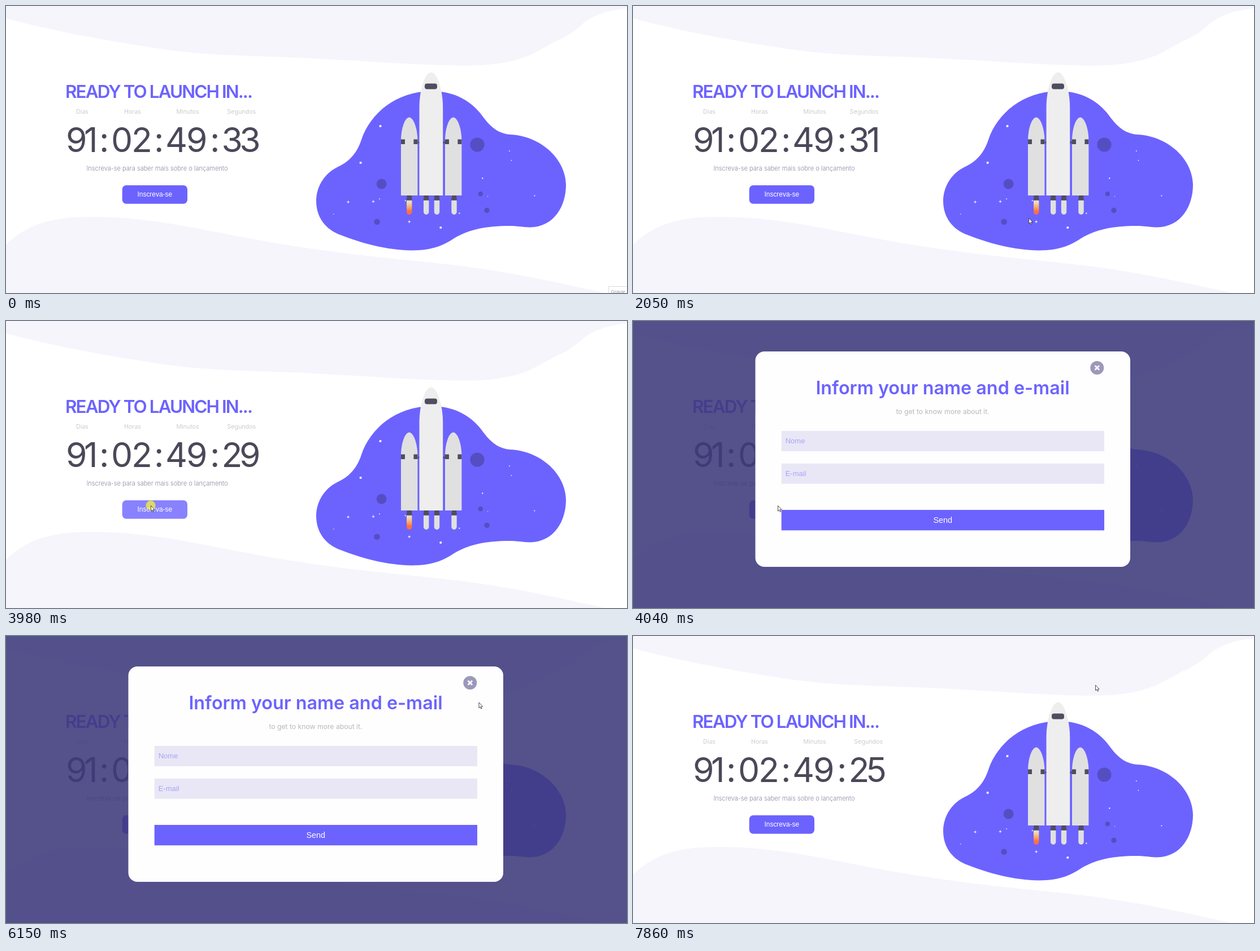
An HTML page that plays this animation: 1099x509 px, repeating every 8000 ms.

```html
<!DOCTYPE html>
<html lang="pt">
<head>
<meta charset="utf-8">
<title>Countdown</title>
<style>
html, body { margin: 0; width: 100%; height: 100%; overflow: hidden; background: #fff; }
svg { display: block; width: 1099px; height: 509px; }
text { font-family: Inter, sans-serif; white-space: pre; }
.ui { font-family: "Liberation Sans", Arial, sans-serif; }
.mid { text-anchor: middle; }
.label { font-size: 10.8px; font-weight: 300; fill: #bdbdbd; }
.num { font-size: 60.5px; fill: #4b4859; letter-spacing: -2.2px; }
.tight { letter-spacing: -5.5px; }
</style>
</head>
<body>
<svg viewBox="0 0 1099 509" xmlns="http://www.w3.org/2000/svg">
  <defs>
    <linearGradient id="fire" x1="0" y1="0" x2="0" y2="1">
      <stop offset="0" stop-color="#e0e0e0"/>
      <stop offset=".2" stop-color="#f3d3a8"/>
      <stop offset=".5" stop-color="#f9a860"/>
      <stop offset=".75" stop-color="#ff7043"/>
    </linearGradient>
  </defs>

  <g fill="#f6f5fc">
    <path d="M0 0H1099V4C1060 9 1040 16 1020 32C1005 46 998 50 985 57C960 68 950 76 925 88C880 106 830 107 775 105C690 103 600 95 500 91C420 88 350 87 280 77C180 62 90 46 0 22Z"/>
    <path d="M0 423C40 385 85 374 150 374C270 374 360 401 480 421C600 441 680 447 780 458C880 469 970 489 1060 509H0Z"/>
  </g>

  <text x="105" y="162.5" font-size="31.5" font-weight="600" fill="#6c63ff" letter-spacing="-1.95">READY TO LAUNCH IN...</text>
  <g class="label mid">
    <text x="135" y="191">Dias</text>
    <text x="224" y="191">Horas</text>
    <text x="321.5" y="191">Minutos</text>
    <text id="secLabel" y="191">Segundos</text>
  </g>
  <g class="num">
    <text x="106" y="258.500" class="tight">91</text>
    <text x="165" y="258.500">:</text>
    <text x="186" y="258.500">02</text>
    <text x="262" y="258.500">:</text>
    <text x="282" y="258.500">49</text>
    <text x="361" y="258.500">:</text>
    <text id="sec" x="381.500" y="258.500" class="tight"></text>
  </g>
  <text x="267.500" y="292" class="mid" font-size="11.050" font-weight="300" fill="#8d88a3">Inscreva-se para saber mais sobre o lançamento</text>
  <rect id="join" x="205.700" y="318" width="115.300" height="32.700" rx="7"/>
  <text x="263.300" y="338.300" class="ui mid" font-size="11.900" fill="#fff">Inscreva-se</text>

  <path fill="#6c63ff" d="M752 151C690 152 645 190 629 237C621 262 606 277 586 286C562 298 549 322 549 346C549 376 567 397 592 406C630 421 675 433 718 433.500C755 433.500 775 424 793 412C820 396 850 390 890 390C905 390 914 392 927 392.500C970 392 991 355 991 317C990 270 945 230 892 228C870 226 857 213 846 199C827 171 797 151 752 151Z"/>
  <g id="sky"></g>
  <g id="rocket">
    <path fill="#4f4d60" d="M728 240.500H778V243.500H728Z"/>
    <path fill="#eee" d="M731.500 336V180C731.500 150 741 118 752.300 117.500C763.500 118 773.200 150 773.200 180V336Z"/>
    <rect x="741" y="137.500" width="22" height="10" rx="4" fill="#4f4d60"/>
  </g>

  <g id="save">
    <rect x="1066.500" y="497.500" width="40" height="20" fill="#fff" stroke="#dadada"/>
    <text x="1070.500" y="510" class="ui" font-size="8.300" fill="#999">Gravar</text>
  </g>

  <g id="modal">
    <rect width="1099" height="509" fill="#3e3a7c" opacity=".88"/>
    <rect x="216.500" y="54" width="663.500" height="382" rx="16" fill="#fefefe"/>
    <circle id="close" cx="821.300" cy="83" r="12"/>
    <path d="M817.500 79.200l7.600 7.600m0 -7.600l-7.600 7.600" stroke="#fff" stroke-width="2.800"/>
    <text x="548" y="130" class="mid" font-size="32.300" font-weight="600" fill="#6c63ff">Inform your name and e-mail</text>
    <text x="548" y="165" class="mid" font-size="12.200" fill="#b9b6bd">to get to know more about it.</text>
    <g fill="#e9e7f5">
      <rect x="262.700" y="195" width="571.300" height="36"/>
      <rect x="262.700" y="252.700" width="571.300" height="36"/>
    </g>
    <g font-size="13" fill="#a8a2fb">
      <text x="269.700" y="217" class="ui">Nome</text>
      <text x="269.700" y="274.700" class="ui">E-mail</text>
    </g>
    <rect x="262.700" y="335" width="571.300" height="36.300" fill="#6c63ff"/>
    <text x="548.300" y="358" class="ui mid" font-size="14.400" fill="#fff">Send</text>
  </g>

  <g id="pointer">
    <circle id="tap" r="8.500" fill="#ffff1e" opacity=".7"/>
    <path d="M.5 .5V10.200L2.700 8.200L4.200 11.700L5.700 11L4.200 7.700H7.200Z" fill="#fff" stroke="#222" stroke-width=".8"/>
  </g>
</svg>
<script>
const LOOP = 8000, OPEN = 4040, CLOSE = 7860, DARK = "#4f4d60";
const $ = id => document.getElementById(id);

function add(parent, tag, attrs) {
  const el = document.createElementNS("http://www.w3.org/2000/svg", tag);
  for (const k in attrs) el.setAttribute(k, attrs[k]);
  $(parent).append(el);
}
const dot = (cx, cy, r, fill = "#fff") => add("sky", "circle", { cx, cy, r, fill });

function drawSky() {
  const planets = [[834, 246, 12.6], [664.6, 315.6, 9], [656.5, 382.7, 5.3], [839.8, 333.2, 4.2], [851, 362.5, 4.7]];
  for (const p of planets) dot(...p, "#554ec3");
  for (const [x, y] of [[662.5, 213], [627.6, 278], [769.3, 393]]) dot(x, y, 2.1);
  for (const [x, y] of [[605.6, 347.6], [650, 346.8], [713.7, 382.6]])
    add("sky", "path", { d: `M${x - 2.3} ${y}h4.6M${x} ${y - 2.3}v4.6`, stroke: "#fff" });

  // faint stars, scattered by a seeded generator
  let seed = 7;
  const rnd = () => (seed = seed * 16807 % 2147483647) / 2147483647;
  for (let i = 0; i < 13; i++) dot(580 + rnd() * 385, 240 + rnd() * 140, 0.6 + rnd() * 0.6);
}

function drawRocket() {
  for (const x of [699, 777]) {
    add("rocket", "path", { d: `M${x} 336V240c0 -24 7 -42 14.600 -42.500c7.400 .5 14.800 18.500 14.800 42.500V336Z`, fill: "#e0e0e0" });
    for (const dx of [0, 22.4])
      add("rocket", "rect", { x: x + dx, y: 236.5, width: 7, height: 8.5, fill: DARK });
  }
  [713.7, 743.7, 762.5, 793].forEach((x, i) => {
    add("rocket", "path", { d: `M${x - 4} 335.900h8l1 9h-10Z`, fill: DARK });
    add("rocket", "path", { d: `M${x - 4.7} 344.800h9.400v20.500a4.700 4.700 0 0 1 -9.400 0Z`, fill: i ? "#e0e0e0" : "url(#fire)" });
  });
}

// pointer path: time, x, y
const route = [[600, 1074, 497], [1230, 861, 362.5], [2190, 673, 378], [2890, 442.5, 371], [3370, 256, 327],
  [4630, 256, 327], [5470, 559, 191], [6150, 836.5, 117.5], [6710, 818, 86.5], [LOOP, 818, 86.5]];
function pointerAt(t) {
  const i = route.findIndex(p => p[0] > t);
  if (i < 1) return null;
  const [t0, x0, y0] = route[i - 1], [t1, x1, y1] = route[i];
  const k = (t - t0) / (t1 - t0);
  return [x0 + (x1 - x0) * k, y0 + (y1 - y0) * k];
}

const within = (v, a, b) => v >= a && v < b;
const show = (id, on) => $(id).setAttribute("display", on ? "inline" : "none");

function draw(t) {
  const left = 33 - Math.floor((t + 900) / 1000);
  $("sec").textContent = left;
  $("secLabel").setAttribute("x", left % 10 === 1 ? 409 : 416.7);

  const open = within(t, OPEN, CLOSE);
  show("save", t < 70);
  show("modal", open);

  const p = pointerAt(t);
  const [x, y] = p || [0, 0];
  show("pointer", p);
  show("tap", [OPEN, CLOSE].some(end => within(t, end - 145, end)));
  $("pointer").setAttribute("transform", `translate(${x} ${y})`);

  const overJoin = !open && within(x, 205, 321) && within(y, 318, 351);
  const overClose = Math.hypot(x - 821.3, y - 83) < 12;
  $("join").setAttribute("fill", overJoin ? "#8982ff" : "#6c63ff");
  $("close").setAttribute("fill", overClose ? "#cbc9d9" : "#9c98bb");
}

function tick(now) {
  draw(now % LOOP);
  requestAnimationFrame(tick);
}
drawSky();
drawRocket();
draw(0);
requestAnimationFrame(tick);
</script>
</body>
</html>
```
